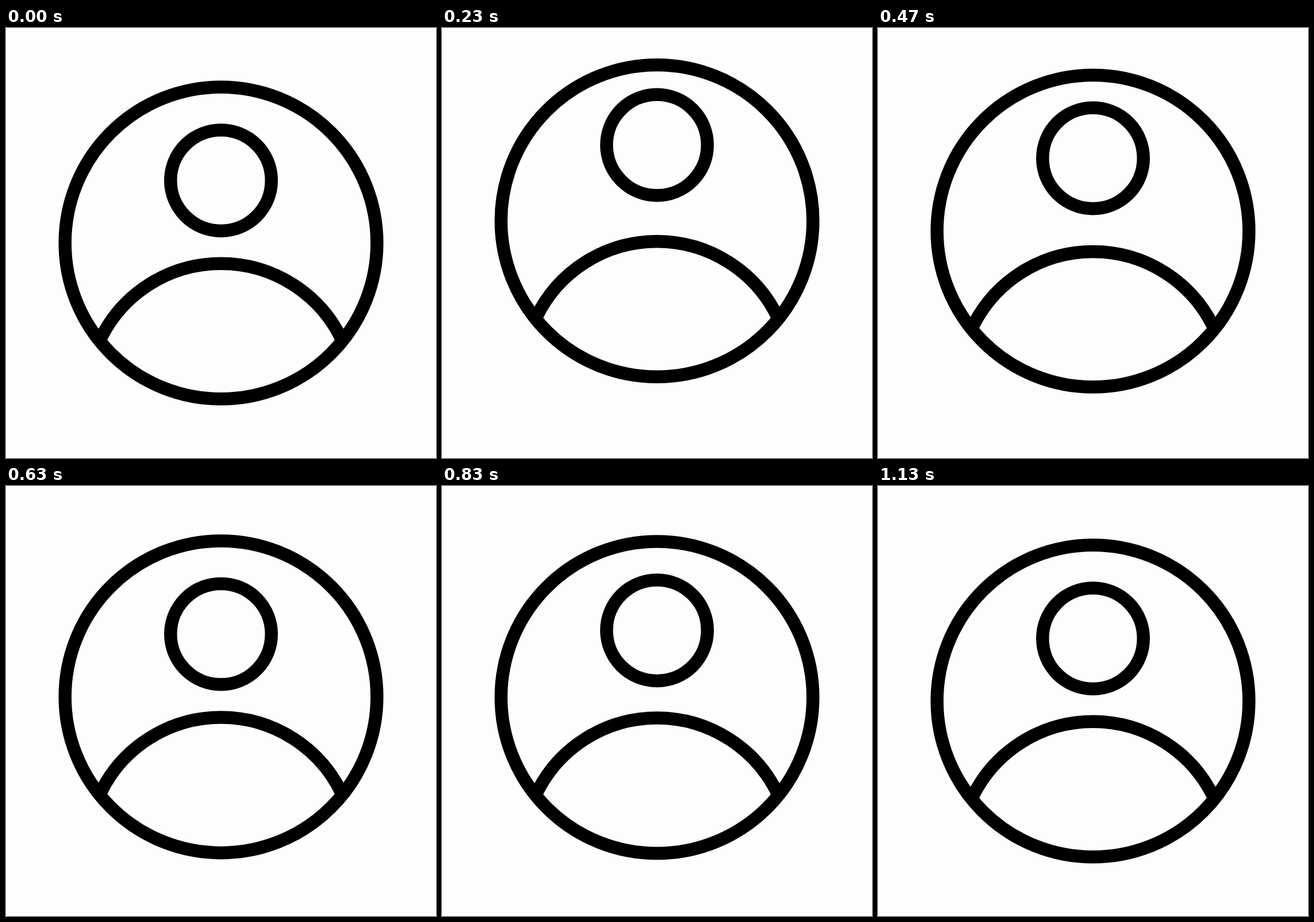
These frames come from a looping animation (748x748 px, 1160 ms). An HTML page:

```html
<!DOCTYPE html>
<html lang="en">
<head>
<meta charset="utf-8">
<title>Bouncing avatar</title>
<style>
  html, body { margin: 0; width: 100%; height: 100%; overflow: hidden; background: #fdfdfd; }
  svg { display: block; width: 100%; height: 100%; }
</style>
</head>
<body>
<svg viewBox="0 0 748 748" fill="none" stroke="#000" stroke-width="22.5">
  <g id="badge">
    <circle cx="374" cy="374" r="271.3"/>
    <path d="M162.8 544.3A233 233 0 0 1 585.2 544.3"/>
  </g>
  <circle id="head" cx="374" cy="265.2" r="87.7"/>
</svg>
<script>
  const LOOP = 1160;
  const STEP = 100 / 3; // 30 poses per second

  // Each hop: start, end (ms) and height (px)
  const parts = [
    { el: document.getElementById('badge'), hops: [[29, 545, 40.2], [545, 906, 9.7]] },
    { el: document.getElementById('head'), hops: [[38, 560, 65.8], [560, 1030, 14.4]] }
  ];

  function lift(hops, t) {
    const hop = hops.find(([from, to]) => t >= from && t < to);
    if (!hop) return 0;
    const [from, to, height] = hop;
    const p = (t - from) / (to - from);
    return 4 * height * p * (1 - p);
  }

  function draw(now) {
    const t = Math.floor((now % LOOP + 5) / STEP) * STEP;
    for (const { el, hops } of parts) {
      el.setAttribute('transform', `translate(0 ${-lift(hops, t).toFixed(2)})`);
    }
  }

  const start = performance.now();
  function tick() {
    draw(performance.now() - start);
    requestAnimationFrame(tick);
  }
  tick();
</script>
</body>
</html>
```
